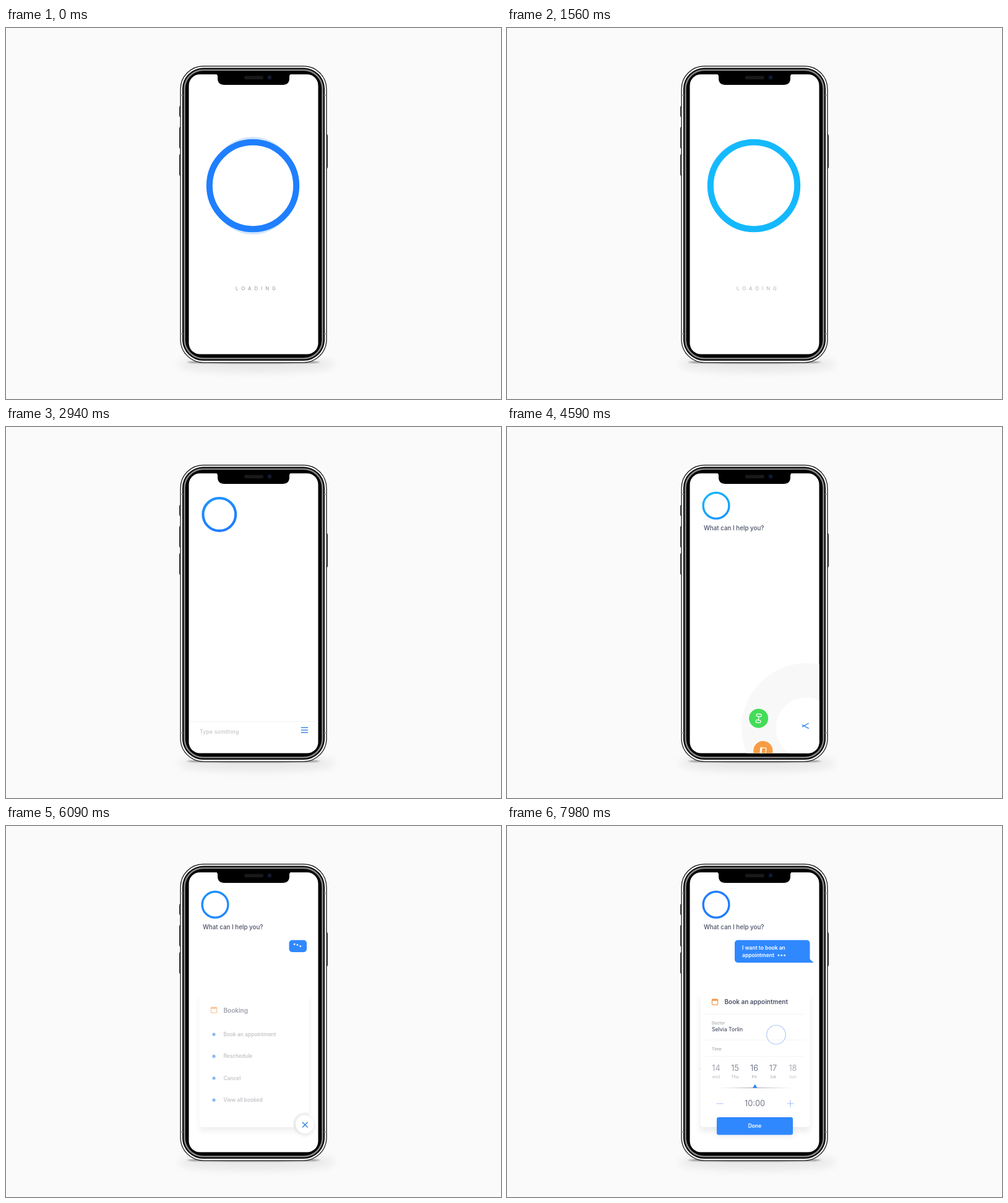
Animation of 800x600 px, one loop 8 s. Source, as an HTML page:

```html
<!DOCTYPE html>
<html lang="en">
<head>
<meta charset="utf-8">
<title>Assistant booking</title>
<style>
  html, body { margin: 0; width: 100%; height: 100%; overflow: hidden; background: #fafafa; }
  svg { display: block; width: 100vw; height: 100vh; }
  text { font-family: Inter, "Open Sans", sans-serif; font-weight: 500; fill: #4c5166; }
  .mid { text-anchor: middle; }
  .bold { font-weight: 600; }
  .item { font-size: 8.4px; fill: #85888f; }
  .label { font-size: 6.6px; fill: #a2a4aa; }
  .num { font-size: 13px; font-weight: 300; }
  .day { font-size: 6.5px; fill: #a9abb2; }
  .white { fill: #fff; font-size: 8.5px; font-weight: 600; }
  #card { filter: drop-shadow(0 7px 5px rgba(0,0,0,.075)); }
  #close { filter: drop-shadow(0 2px 3px rgba(0,0,0,.12)); }
  #done { filter: drop-shadow(0 3px 4px rgba(0,0,0,.07)); }
</style>
</head>
<body>
<svg viewBox="0 0 800 600">
  <defs>
    <linearGradient id="ringPaint" x1=".25" y1="0" x2=".75" y2="1">
      <stop id="stopA" offset="0"/><stop id="stopB" offset="1"/>
    </linearGradient>
    <linearGradient id="rulePaint" gradientUnits="userSpaceOnUse" x1="340" x2="462" y1="0" y2="0">
      <stop offset="0" stop-color="#bbb" stop-opacity="0"/>
      <stop offset=".5" stop-color="#999"/>
      <stop offset="1" stop-color="#bbb" stop-opacity="0"/>
    </linearGradient>
    <clipPath id="screen"><rect x="295.5" y="75" width="209" height="452.5" rx="18"/></clipPath>
    <clipPath id="dates"><rect x="311" y="375" width="178" height="40"/></clipPath>
    <filter id="soft" x="-20%" y="-150%" width="140%" height="400%"><feGaussianBlur stdDeviation="7"/></filter>
    <filter id="tight" x="-20%" y="-300%" width="140%" height="700%"><feGaussianBlur stdDeviation="1.2"/></filter>
    <g id="calendar" fill="none" stroke-width="1.2">
      <rect x="-4.6" y="-4.4" width="9.2" height="9" rx="1"/>
      <path d="M-4.6 -3.2H4.6" stroke-width="2.8"/>
    </g>
  </defs>

  <!-- phone -->
  <ellipse cx="405" cy="544" rx="128" ry="13" opacity=".07" filter="url(#soft)"/>
  <ellipse cx="400" cy="540.5" rx="108" ry="1.8" opacity=".6" filter="url(#tight)"/>
  <g fill="#ddd" stroke="#111" stroke-width="1">
    <rect x="280.5" y="126.500" width="4" height="17" rx="1"/>
    <rect x="280.5" y="160.500" width="4" height="34" rx="1"/>
    <rect x="280.5" y="204.500" width="4" height="34" rx="1"/>
    <rect x="515.5" y="172.500" width="4" height="54" rx="1"/>
  </g>
  <rect x="282" y="61.700" width="236" height="479.300" rx="37" fill="#f3f3f3" stroke="#111" stroke-width="1.2"/>
  <rect x="285" y="64.600" width="230" height="473.400" rx="34" fill="#050505"/>
  <rect x="288.500" y="68" width="223" height="466.500" rx="30.500" fill="#000" stroke="#858585" stroke-width="2.600"/>
  <rect x="291" y="70.500" width="218" height="461.500" rx="26" fill="#000"/>
  <path d="M282 109h4M514 109h4M282 494.500h4M514 494.500h4" stroke="#8b9089" stroke-width="1.500"/>
  <rect x="295.500" y="75" width="209" height="452.500" rx="18" fill="#fff"/>

  <g clip-path="url(#screen)">
    <ellipse id="halo" fill="#d3e6fb"/>
    <circle id="ring" fill="#fff" stroke="url(#ringPaint)"/>
    <text id="loading" x="371" y="423.500" font-size="7.8" letter-spacing="5" style="fill:#a4a4a4">LOADING</text>
    <text id="question" x="318" font-size="9.8">What can I help you?</text>

    <g id="input">
      <path d="M296 476.500H505" stroke="#f3f3f3"/>
      <text x="313" y="495.500" font-size="8.6" letter-spacing=".2" style="fill:#c4c4c4">Type somthing</text>
    </g>

    <g id="menu">
      <circle id="menuOuter" cx="484" cy="487" fill="#f8f8f8"/>
      <circle id="menuInner" cx="484" cy="487" fill="#fff"/>
      <g id="fitness">
        <circle r="15.500" fill="#44dc58"/>
        <g fill="none" stroke="#fff" stroke-width="1.300">
          <rect x="-7" y="-4" width="4" height="8" rx="1.500"/>
          <rect x="3" y="-4" width="4" height="8" rx="1.500"/>
          <path d="M-3 0H3"/>
        </g>
      </g>
      <g id="booking">
        <circle r="15.500" fill="#f89b42"/>
        <use href="#calendar" stroke="#fff"/>
      </g>
    </g>

    <g id="cardGroup">
      <rect id="card" x="312.500" y="270" width="177" height="217" rx="5" fill="#fff"/>
      <g id="list"></g>
      <g id="form">
        <use href="#calendar" x="336" y="284.500" stroke="#f5994a"/>
        <text class="bold" x="351.500" y="288" font-size="10">Book an appointment</text>
        <path d="M320 304.500H481M320 346H481M320 372.500H481" stroke="#f4f4f4"/>
        <text class="label" x="331" y="320.500">Doctor</text>
        <text x="331" y="332" font-size="8.6">Selvia Torlin</text>
        <text class="label" x="331" y="363">Time</text>
        <g clip-path="url(#dates)"><g id="days"></g></g>
        <path d="M340 423.500H462" stroke="url(#rulePaint)"/>
        <path d="M397 423.500l3.700 -6 3.700 6z" fill="#2f86ff"/>
        <path d="M338.500 449h11M452.500 449h11M458 443.500v11" stroke="#9dc2fb" stroke-width="1.200"/>
        <text class="num mid" x="400.500" y="453">10:00</text>
      </g>
    </g>

    <path id="notch" d="M489.500 466.700A17 17 0 0 0 466.500 487" fill="none" stroke="#eee" stroke-width="4"/>
    <circle id="close" cx="483" cy="483" r="14.500" fill="#fff"/>
    <g id="icon" stroke="#2f80e8" stroke-width="1.400">
      <line id="barA"/><line id="barB"/><line id="barC"/>
    </g>

    <g id="done">
      <rect x="339" y="471" width="123" height="28.500" rx="3" fill="#3088ff"/>
      <text class="white mid" x="400.500" y="488.300">Done</text>
    </g>

    <g id="bubble">
      <path id="tail" d="M480 221H495.500L487 213z" fill="#3088ff"/>
      <rect id="bubbleBox" y="184.500" rx="5" fill="#3088ff"/>
      <g id="reply">
        <text class="white" x="380" y="200">I want to book an</text>
        <text class="white" x="380" y="212">appointment</text>
      </g>
      <g id="dots" fill="#fff"><circle/><circle/><circle/></g>
    </g>

    <circle id="tap" cx="435" cy="337.500" fill="none" stroke="#adc8f6" stroke-width="1.100"/>
  </g>

  <path d="M338 74.500q4 0 4 4v2.500q0 11 11 11h94q11 0 11 -11v-2.500q0 -4 4 -4z" fill="#000"/>
  <rect x="385" y="77.500" width="31" height="5.500" rx="2.700" fill="#191919"/>
  <circle cx="426" cy="80" r="4" fill="#0a0e20"/>
  <circle cx="426" cy="80" r="1.200" fill="#24376c"/>
</svg>

<script>
const DURATION = 8000;
const $ = id => document.getElementById(id);
const set = (el, attrs) => {
  for (const key in attrs) (el.nodeType ? el : $(el)).setAttribute(key, attrs[key]);
};
const lerp = (a, b, p) => a + (b - a) * p;
const part = (t, from, to) => Math.min(1, Math.max(0, (t - from) / (to - from)));
const inOut = (p, power = 3) =>
  p < .5 ? (2 * p) ** power / 2 : 1 - (2 - 2 * p) ** power / 2;
const out = p => 1 - (1 - p) ** 3;
const smooth = (t, from, to) => inOut(part(t, from, to));
const mix = p => `rgb(${[[32, 124, 255], [20, 188, 253]].reduce((a, b) => a.map((v, i) => Math.round(lerp(v, b[i], p))))})`;

function track(t, times, values) {
  let i = 1;
  while (i < times.length - 1 && t > times[i]) i++;
  return lerp(values[i - 1], values[i], part(t, times[i - 1], times[i]));
}

const options = ["Book an appointment", "Reschedule", "Cancel", "View all booked"];
$("list").innerHTML =
  `<use href="#calendar" x="336" y="296.500" stroke="#f5994a"/>
   <text class="bold" x="351.500" y="300.500" font-size="10">Booking</text>` +
  options.map((name, i) => {
    const y = 336 + i * 35.4;
    return `<circle cx="336" cy="${y}" r="2.600" fill="#2f80e8"/>
            <text class="item" x="351.500" y="${y + 2.800}">${name}</text>`;
  }).join("");

$("days").innerHTML = ["Tue", "wed", "Thu", "Fri", "Sat", "Sun"].map((day, i) => {
  const x = [306, 338, 368.5, 399.5, 430, 462][i];
  const opacity = [.5, .65, .85, 1, .85, .6][i];
  return `<g class="mid" opacity="${opacity}"><text class="num" x="${x}" y="396">${13 + i}</text>
          <text class="day" x="${x}" y="408">${i ? day : ""}</text></g>`;
}).join("");

const colorTimes = [0, 930, 1560, 2940, 4590, 6090, 7980];

function drawRing(t) {
  const p = inOut(part(t, 2430, 3240), 5);
  const pulse = Math.cos(t / 2500 * 2 * Math.PI);
  const cx = lerp(399, 338, p), cy = lerp(255, 127.2, p);
  const outer = lerp(75.2, 22.6, p), width = lerp(10, 3.4, p);
  set("ring", { cx, cy, r: outer - width / 2, "stroke-width": width });
  set("stopA", { "stop-color": mix(track(t, colorTimes, [.05, .8, .97, .35, .9, .3, 0])) });
  set("stopB", { "stop-color": mix(track(t, colorTimes, [.05, .4, .93, 0, .4, .2, 0])) });
  set("halo", {
    rx: 77.3 + 1.7 * pulse, ry: 72, opacity: 1 - part(t, 2430, 2520),
    transform: `translate(399 255) rotate(${90 + t * .0865})`
  });
  set("loading", { opacity: (.85 + .15 * pulse) * (1 - part(t, 2430, 2640)) });
}

function drawInput(t) {
  const shown = smooth(t, 2550, 3000);
  set("input", {
    opacity: shown * (1 - part(t, 4080, 4330)),
    transform: `translate(0 ${14 * (1 - shown)})`
  });
  const asked = smooth(t, 3350, 3850);
  set("question", { opacity: asked, y: 167 + 4 * (1 - asked) });

  const morph = part(t, 4320, 4770);
  const y = lerp(490, 483.3, smooth(t, 4150, 4500)) + 14 * (1 - shown);
  const x1 = lerp(476.8, 479, part(morph, .6, 1)), x2 = lerp(488, 487.6, morph);
  const left = 4 - 2.5 * Math.sin(Math.PI * morph) + .3 * morph;
  const right = lerp(4, -4.3, Math.min(1, 2 * morph));
  set("barA", { x1, x2, y1: y - left, y2: y - right });
  set("barB", { x1, x2, y1: y + left, y2: y + right });
  set("barC", { x1, x2, y1: y, y2: y, opacity: 1 - part(morph, 0, .3) });
  set("icon", { opacity: shown * (1 - part(t, 6650, 6800)) });
}

function drawMenu(t) {
  const open = out(part(t, 4130, 4560));
  const shut = smooth(t, 5270, 5740);
  set("menuOuter", { r: lerp(105 * open, 20, shut) });
  set("menuInner", { r: lerp(49.5 * open, 14.5, shut) });
  set("menu", { opacity: open * (1 - part(t, 5720, 5950)) });

  const turn = -180 * (1 - smooth(t, 4180, 4980));
  const scale = 1 - smooth(t, 5250, 5600);
  [["fitness", 275], ["booking", 236]].forEach(([id, rest]) => {
    const angle = (rest + turn) * Math.PI / 180;
    const radius = 79 * (.3 + .7 * scale);
    const x = 484 + radius * Math.cos(angle), y = 487 + radius * Math.sin(angle);
    set(id, { transform: `translate(${x} ${y}) rotate(${turn}) scale(${scale})` });
  });
}

function drawCard(t) {
  const gone = part(t, 6550, 6780);
  const form = smooth(t, 6720, 7120);
  const shown = part(t, 5820, 6150);
  const control = part(t, 5550, 5800) * (1 - part(t, 6650, 6850));
  set("card", { opacity: shown });
  set("list", {
    opacity: lerp(0, .55, part(t, 5850, 6090)) * (1 - gone) + .45 * part(t, 6090, 6350) * (1 - gone),
    transform: `translate(0 ${lerp(14, -12, smooth(t, 5830, 6350))})`
  });
  set("form", { opacity: form, transform: `translate(0 ${14 * (1 - form)})` });
  set("days", { transform: `translate(${30 * (1 - smooth(t, 6800, 7300))} 0)` });
  set("close", { opacity: control });
  set("notch", { opacity: control * shown });
  const done = smooth(t, 6800, 7200);
  set("done", {
    opacity: done,
    transform: `translate(400.5 485) scale(${lerp(.3, 1, done)} 1) translate(-400.5 -485)`
  });
}

function drawBubble(t) {
  const shown = out(part(t, 5800, 6030));
  const grown = smooth(t, 6600, 7020);
  const x = lerp(457.5, 368, grown);
  set("bubble", {
    opacity: Math.min(1, shown * 2),
    transform: `translate(486 194) scale(${shown}) translate(-486 -194)`
  });
  set("bubbleBox", { x, width: lerp(486, 489.5, grown) - x, height: lerp(19.5, 36.5, grown) });
  set("tail", { opacity: part(grown, .85, 1) });
  set("reply", { opacity: smooth(t, 6900, 7150) });
  [...$("dots").children].forEach((dot, i) => {
    const wave = -2 * Math.cos((t - 6090) / 130 - i * 1.1) * (1 - grown);
    set(dot, {
      cx: lerp(466.2, 439, grown) + i * 4.8,
      cy: lerp(193.2, 209.2, grown) + wave,
      r: 1.35
    });
  });
  const tap = out(part(t, 7700, 7960));
  set("tap", { r: 15.3 * tap, opacity: tap });
}

function draw(now) {
  const t = now % DURATION;
  drawRing(t);
  drawInput(t);
  drawMenu(t);
  drawCard(t);
  drawBubble(t);
}

let start;
function frame(now) {
  start ??= now;
  draw(now - start);
  requestAnimationFrame(frame);
}
draw(0);
requestAnimationFrame(frame);
</script>
</body>
</html>
```
